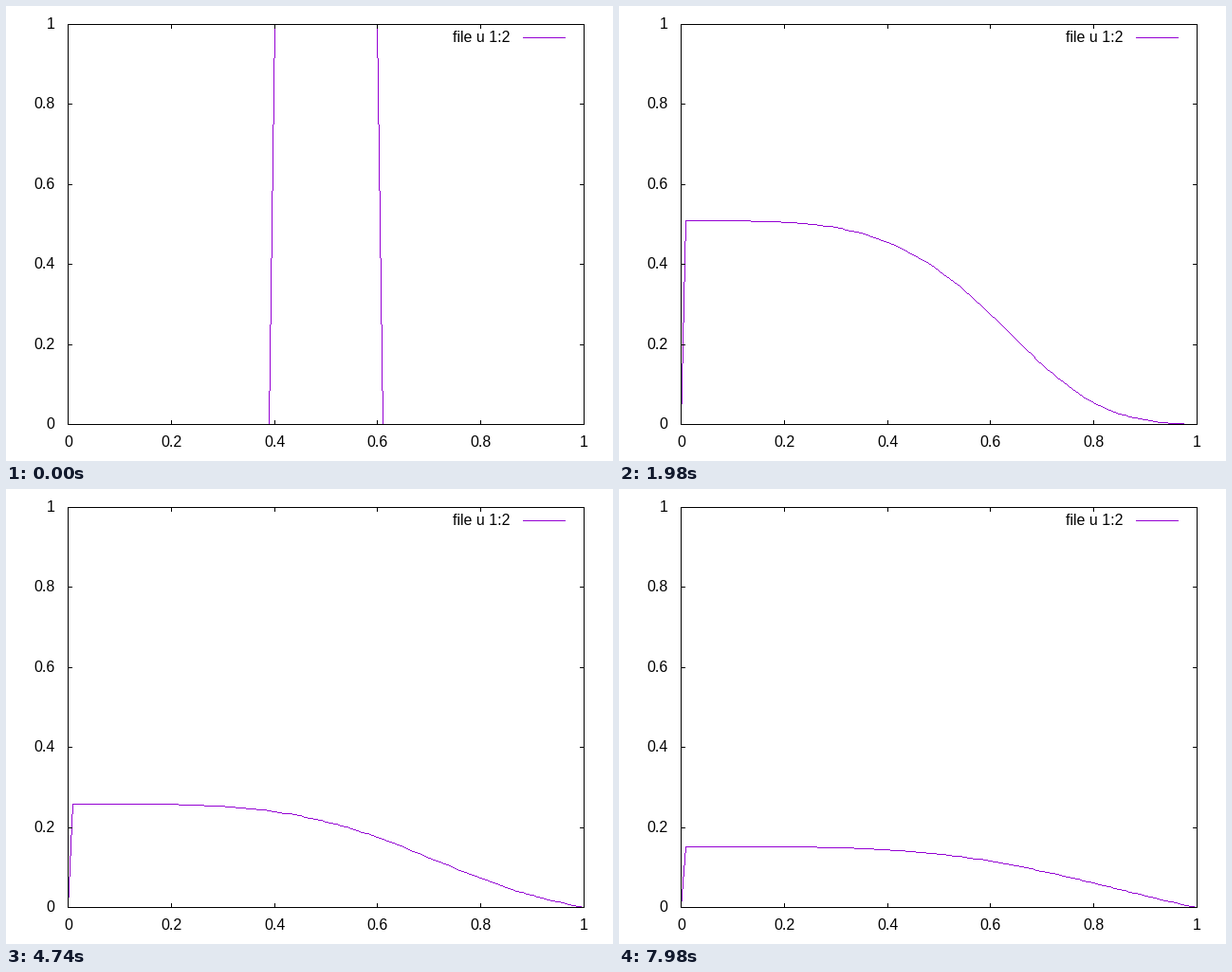
A matplotlib script that plays this animation: 640 by 480 pixels, repeating every 8000 ms.

```python
import numpy as np
import matplotlib.pyplot as plt
from matplotlib.animation import FuncAnimation

W, H, DPI = 640, 480, 100
LEFT, RIGHT, TOP, BOTTOM = 65, 609, 19, 441
PX = 72 / DPI                      # one pixel in points
TICK = 4
INTERVAL, LOOP, STEP = 20, 8000, 60
PURPLE = "#9400d3"

plt.rcParams["font.family"] = "Liberation Sans"
plt.rcParams["text.hinting"] = "native"
plt.rcParams["path.simplify"] = False


def to_col(x):
    return np.round(LEFT + (RIGHT - LEFT) * np.asarray(x)).astype(int)


def to_row(u):
    return np.round(BOTTOM - (BOTTOM - TOP) * np.asarray(u)).astype(int)


def walk(a0, b0, a1, b1):
    """Bresenham line along its longer axis a."""
    if a0 > a1:
        a0, b0, a1, b1 = a1, b1, a0, b0
    n, rise = a1 - a0, b1 - b0
    i = np.arange(n + 1)
    shift = (2 * i * abs(rise) + n) // max(2 * n, 1)
    return a0 + i, b0 + np.sign(rise) * shift


def pixels(cols, rows):
    """Polyline as one-pixel dashes without smoothing."""
    xs, ys = [], []
    for x0, y0, x1, y1 in zip(cols[:-1], rows[:-1], cols[1:], rows[1:]):
        if abs(x1 - x0) >= abs(y1 - y0):
            x, y = walk(x0, y0, x1, y1)
        else:
            y, x = walk(y0, x0, y1, x1)
        xs.append(x)
        ys.append(y)
    x, y = np.concatenate(xs), np.concatenate(ys)
    gap = np.full(len(x), np.nan)
    return (np.column_stack([x, x + 1, gap]).ravel(),
            np.repeat(y + 0.5, 3))


def diffuse(count, n=100, span=2e-4, sub=20):
    """Solve x^4 u_t = (x^2 u_x)_x for a square pulse, one row per step."""
    x = np.linspace(0, 1, n + 1)
    flux = ((x[:-1] + x[1:]) / 2) ** 2 * n ** 2
    flux[0] = 0                    # nothing passes through the centre
    weight = x[1:-1, None] ** 4
    a = (np.diag(-flux[:-1] - flux[1:])
         + np.diag(flux[1:-1], 1) + np.diag(flux[1:-1], -1)) / weight
    once = np.linalg.inv(np.eye(n - 1) - span / sub * a)
    advance = np.linalg.matrix_power(once, sub)

    rows = np.zeros((count, n + 1))
    rows[0] = np.abs(x - 0.5) < 0.1001
    for k in range(1, count):
        rows[k, 1:-1] = advance @ rows[k - 1, 1:-1]
    return x, rows


fig = plt.figure(figsize=(W / DPI, H / DPI), dpi=DPI, facecolor="white")
ax = fig.add_axes([0, 0, 1, 1])
ax.set_xlim(0, W)
ax.set_ylim(H, 0)
ax.axis("off")


def stroke(cols, rows, color="black", z=3):
    line, = ax.plot(*pixels(cols, rows), color=color, lw=PX, zorder=z,
                    solid_capstyle="butt", snap=False)
    return line


def label(x, y, text, align):
    ax.text(x, y, text, ha=align, va="baseline", fontsize=16 * PX,
            color="black", zorder=4)


stroke([LEFT, RIGHT, RIGHT, LEFT, LEFT], [TOP, TOP, BOTTOM, BOTTOM, TOP])

for i in range(6):
    v = i / 5
    col, row = to_col(v), to_row(v)
    if 0 < i < 5:
        stroke([col, col], [BOTTOM, BOTTOM - TICK])
        stroke([col, col], [TOP, TOP + TICK])
        stroke([LEFT, LEFT + TICK], [row, row])
        stroke([RIGHT, RIGHT - TICK], [row, row])
    label(col + 0.5, 465, f"{v:g}", "center")
    label(51.5, row + 5, f"{v:g}", "right")

label(531.5, 38, "file u 1:2", "right")
stroke([545, 589], [33, 33], PURPLE)

grid, states = diffuse(LOOP // STEP)
columns = to_col(grid)
curve = stroke(columns, to_row(states[0]), PURPLE, z=2)


def draw(frame):
    k = max(0, frame * INTERVAL // STEP - 1)
    curve.set_data(*pixels(columns, to_row(states[k])))
    return curve,


anim = FuncAnimation(fig, draw, frames=LOOP // INTERVAL, interval=INTERVAL,
                     repeat=True, repeat_delay=0, blit=False)
plt.show()
```
